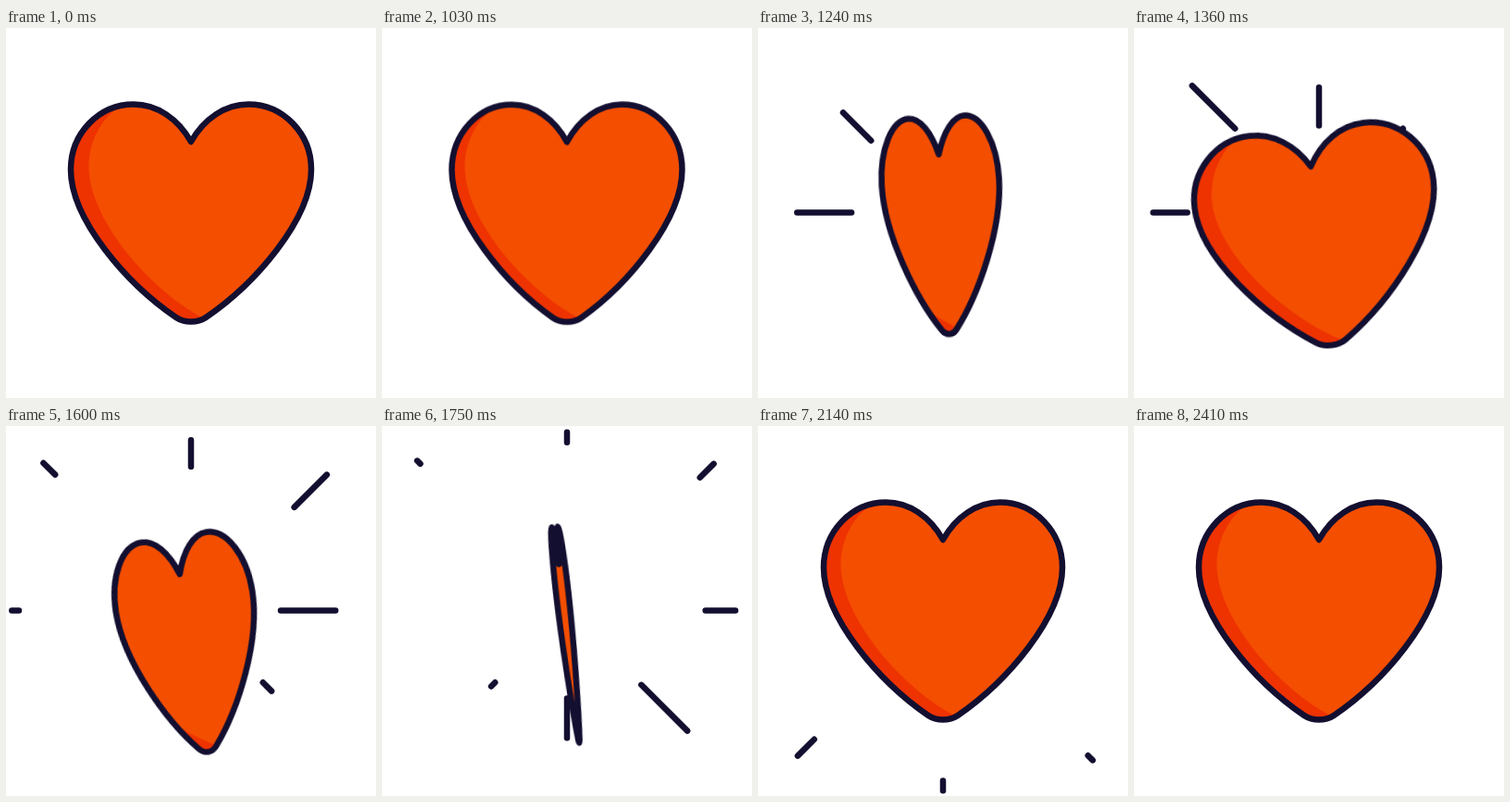
Write an HTML page without scripts that moves like this. It is 400x400 px and loops after 2.44 s.

```html
<!DOCTYPE html>
<html lang="en">
<head>
<meta charset="utf-8">
<title>Spinning heart</title>
<style>
  @property --head { syntax: "<number>"; inherits: false; initial-value: 0; }
  @property --tail { syntax: "<number>"; inherits: false; initial-value: 0; }

  :root {
    --loop: 2440ms;
    --ink: #130f30;
    --front: path("M0-77C-14-102-37-117.5-62-117.5C-99.5-117.5-130-86-130-47C-130 7-69 77-16 113C-7 119 7 119 16 113C69 77 130 7 130-47C130-86 99.5-117.5 62-117.5C37-117.5 14-102 0-77Z");
    --back: path("M0-77C14-102 37-117.5 62-117.5C99.5-117.5 130-86 130-47C130 7 69 77 16 113C7 119-7 119-16 113C-69 77-130 7-130-47C-130-86-99.5-117.5-62-117.5C-37-117.5-14-102 0-77Z");
  }
  html, body { margin: 0; height: 100%; overflow: hidden; background: #fff; }
  svg { display: block; width: 100%; height: 100%; }

  .outline, line {
    fill: none;
    stroke: var(--ink);
    stroke-width: 6.5;
    stroke-linecap: round;
    stroke-linejoin: round;
  }

  /* Heart: a quick half turn, then a slow one, while it dips and tilts */
  .heart { d: var(--front); animation: spin var(--loop) infinite; }
  @keyframes spin {
    0% { d: var(--front); }
    40.98% { d: var(--front); animation-timing-function: cubic-bezier(.333, 0, .667, 1); }
    55.74% { d: var(--back); animation-timing-function: cubic-bezier(.333, 0, .667, 1); }
    88.93%, 100% { d: var(--front); }
  }
  .dip { animation: dip var(--loop) infinite; }
  @keyframes dip {
    0% { transform: translateY(0) rotate(0deg); }
    40.98% { transform: translateY(0) rotate(0deg); animation-timing-function: cubic-bezier(.4, 0, .7, 1); }
    63.11% { transform: translateY(37.5px) rotate(-9.4deg); animation-timing-function: cubic-bezier(.333, 0, .667, 1); }
    86.48%, 100% { transform: translateY(0) rotate(0deg); }
  }

  /* Rays: the head shoots out, the tail follows on the same curve */
  line {
    visibility: hidden;
    stroke-dasharray: calc(max(var(--head) - var(--tail), .01) * 1px) 300px;
    stroke-dashoffset: calc(var(--tail) * -1px);
    animation: head var(--loop) var(--at) infinite,
               tail var(--loop) calc(var(--at) + 174ms) infinite,
               show var(--loop) var(--at) infinite;
  }
  @keyframes head {
    0% { --head: 0; animation-timing-function: cubic-bezier(.2, .35, .3, 1); }
    24.6%, 100% { --head: 100; }
  }
  @keyframes tail {
    0% { --tail: 0; animation-timing-function: cubic-bezier(.2, .35, .3, 1); }
    24.6%, 92% { --tail: 100; }
    92.01%, 100% { --tail: 0; }
  }
  @keyframes show {
    0%, 27.4% { visibility: visible; }
    27.41%, 100% { visibility: hidden; }
  }
</style>
</head>
<body>
<svg viewBox="-200 -200 400 400">
  <clipPath id="body"><path class="heart"/></clipPath>

  <g transform="translate(0 -.5)">
    <line x1="94" x2="194" pathLength="100" transform="rotate(180)" style="--at:1051ms"/>
    <line x1="110" x2="229" pathLength="100" transform="rotate(225)" style="--at:1141ms"/>
    <line x1="94" x2="194" pathLength="100" transform="rotate(270)" style="--at:1246ms"/>
    <line x1="110" x2="229" pathLength="100" transform="rotate(315)" style="--at:1315ms"/>
    <line x1="94" x2="194" pathLength="100" style="--at:1417ms"/>
    <line x1="110" x2="229" pathLength="100" transform="rotate(45)" style="--at:1567ms"/>
    <line x1="95" x2="196" pathLength="100" transform="rotate(90)" style="--at:1633ms"/>
    <line x1="110" x2="229" pathLength="100" transform="rotate(135)" style="--at:1735ms"/>
  </g>

  <g class="dip">
    <g clip-path="url(#body)">
      <rect x="-150" y="-150" width="300" height="300" fill="#ee3200"/>
      <path d="M-68-120C-92-110-110.5-82-110.5-50C-110.5 5-47 82 14 114V125H150V-125Z" fill="#f44e00"/>
    </g>
    <path class="heart outline"/>
  </g>
</svg>
</body>
</html>
```
